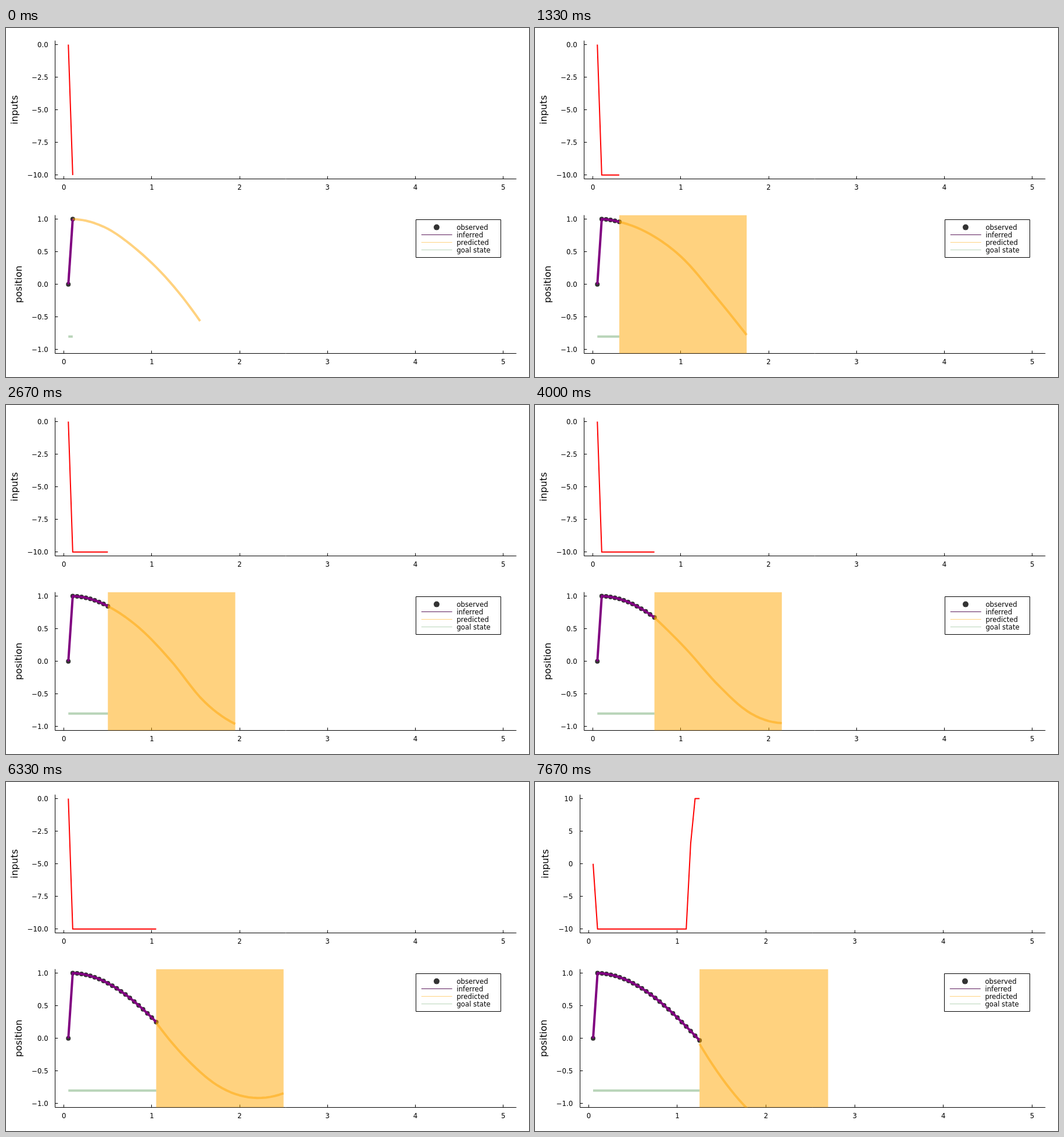
Recreate the animation shown at these times as an HTML page with a canvas. Size 900 by 600 pixels, loop 8 s.

```html
<!DOCTYPE html>
<html lang="en">
<head>
<meta charset="utf-8">
<title>Inputs and position</title>
<style>
  html, body { margin: 0; width: 100%; height: 100%; overflow: hidden; background: #fff; }
  canvas { display: block; width: 900px; height: 600px; }
</style>
</head>
<body>
<canvas id="stage" width="900" height="600"></canvas>
<script>
const ctx = document.getElementById('stage').getContext('2d');
const LOOP = 8000, STEPS = 24, DT = 0.05, HORIZON = 1.45;
const RIGHT = 878.3, X_MIN = -0.1, X_MAX = 5.15;
const TOP = [21.7, 321.7], HEIGHT = 237.9, PAD = HEIGHT * 0.03 / 1.06;
const FONT = '"DejaVu Sans", sans-serif';
const ORANGE = 'rgba(255,165,0,0.5)', GREEN = 'rgba(0,100,0,0.28)', DOT = 'rgba(0,0,0,0.8)';

// Forecast shape: step, then the fall in px below the last observation at five even points.
const FORECASTS = [
  [0, 0, 14, 52, 105, 175.5],
  [4, 0, 22, 63, 126.5, 194.5],
  [8, 0, 38, 95, 162.5, 202.5],
  [12, 0, 54.5, 116, 164, 181.5],
  [16, 0, 62.5, 116.5, 147, 150],
  [19, 1, 66, 111.5, 130, 122.5],
  [23, 6, 87, 144, 181, 197]
];

const crisp = v => Math.floor(v) + 0.5;

function position(i) {
  if (i === 0) return 0;
  const s = (i - 1) * DT;
  return 1 - (0.88 - 0.1 * s * s) * s * (s + DT);
}

function input(i) {
  if (i === 0) return 0;
  return i < 22 ? -10 : i === 22 ? 3.08 : 10;
}

function forecast(step) {
  let n = 0;
  while (n < FORECASTS.length - 2 && FORECASTS[n + 1][0] <= step) n++;
  const a = FORECASTS[n], b = FORECASTS[n + 1];
  const mix = (step - a[0]) / (b[0] - a[0]);
  const p = a.slice(1).map((v, i) => v + (b[i + 1] - v) * mix);
  p.unshift(3 * p[0] - 3 * p[1] + p[2]);
  p.push(3 * p[5] - 3 * p[4] + p[3]);
  return u => {
    const i = Math.min(3, Math.floor(u * 4)), f = u * 4 - i;
    const [p0, p1, p2, p3] = p.slice(i, i + 4);
    return p1 + f / 2 * (p2 - p0 + f * (2 * p0 - 5 * p1 + 4 * p2 - p3 + f * (3 * (p1 - p2) + p3 - p0)));
  };
}

function line(points, color, width) {
  ctx.strokeStyle = color;
  ctx.lineWidth = width;
  ctx.beginPath();
  points.forEach(([x, y]) => ctx.lineTo(x, y));
  ctx.stroke();
}

function dot(x, y, r) {
  ctx.fillStyle = DOT;
  ctx.beginPath();
  ctx.arc(x, y, r, 0, Math.PI * 2);
  ctx.fill();
}

function text(str, x, y, align, size = 11.7) {
  ctx.fillStyle = '#000';
  ctx.font = size + 'px ' + FONT;
  ctx.textAlign = align;
  ctx.fillText(str, x, y);
}

function panel(row, left, lo, hi) {
  const top = TOP[row], bottom = top + HEIGHT;
  return {
    left, top, bottom,
    x: t => left + (t - X_MIN) / (X_MAX - X_MIN) * (RIGHT - left),
    y: v => bottom - PAD - (v - lo) / (hi - lo) * (HEIGHT - 2 * PAD)
  };
}

function axes(p, ticks, digits, label, labelX) {
  const x0 = crisp(p.left), y0 = crisp(p.bottom);
  line([[x0, p.top], [x0, y0], [RIGHT, y0]], '#000', 1);
  for (let t = 0; t <= 5; t++) {
    const x = crisp(p.x(t));
    line([[x, y0], [x, y0 - 4.8]], '#000', 1);
    text(t, p.x(t), p.bottom + 18.2, 'center');
  }
  for (const v of ticks) {
    const y = crisp(p.y(v));
    line([[x0, y], [x0 + 4.8, y]], '#000', 1);
    text(v.toFixed(digits).replace('-', '\u2212'), p.left - 12, p.y(v) + 4.3, 'right');
  }
  ctx.save();
  ctx.translate(labelX, p.top + HEIGHT / 2);
  ctx.rotate(-Math.PI / 2);
  text(label, 0, 0, 'center', 16.2);
  ctx.restore();
}

function clipped(p, paint) {
  ctx.save();
  ctx.beginPath();
  ctx.rect(p.left, p.top, RIGHT - p.left, p.bottom - 0.1 - p.top);
  ctx.clip();
  paint();
  ctx.restore();
}

function legend(x) {
  ctx.fillStyle = '#fff';
  ctx.fillRect(x, 329.5, 852 - x, 65);
  ctx.strokeStyle = '#000';
  ctx.lineWidth = 1;
  ctx.strokeRect(x, 329.5, 851.5 - x, 65);
  dot(x + 35.5, 342.6, 5);
  ['#5a1a5a', ORANGE, GREEN].forEach((color, i) => {
    const y = 355.5 + i * 13;
    line([[x + 9.3, y], [x + 62.3, y]], color, 1);
  });
  ['observed', 'inferred', 'predicted', 'goal state'].forEach((name, i) =>
    text(name, x + 69.9, 347 + i * 13, 'left'));
}

function draw(step) {
  const wide = step >= 21, last = step + 1;
  const left = wide ? 77.1 : 84.6;
  const ids = Array.from({ length: last + 1 }, (_, i) => i);
  const time = i => (i + 1) * DT;

  ctx.fillStyle = '#fff';
  ctx.fillRect(0, 0, 900, 600);

  const upper = panel(0, left, -10, Math.max(...ids.map(input)));
  const ticks = !wide ? [-10, -7.5, -5, -2.5, 0] : step === 21 ? [-10, -5, 0] : [-10, -5, 0, 5, 10];
  axes(upper, ticks, wide ? 0 : 1, 'inputs', wide ? 23.3 : 19.5);
  clipped(upper, () => line(ids.map(i => [upper.x(time(i)), upper.y(input(i))]), '#f00', 2));

  const lower = panel(1, left, -1, 1);
  axes(lower, [-1, -0.5, 0, 0.5, 1], 1, 'position', wide ? 19.5 : 27);
  clipped(lower, () => {
    const track = ids.map(i => [lower.x(time(i)), lower.y(position(i))]);
    track.forEach(([x, y]) => dot(x, y, 4));
    line(track, 'purple', 4);

    const [x0, y0] = track[last], x1 = lower.x(time(last) + HORIZON);
    if (step > 0) {
      ctx.fillStyle = ORANGE;
      ctx.fillRect(x0, lower.top, x1 - x0, HEIGHT);
    }
    const fall = forecast(step), n = HORIZON / DT;
    const path = Array.from({ length: Math.round(n) + 1 }, (_, i) => {
      const u = Math.min(1, i / n);
      return [x0 + (x1 - x0) * u, y0 + fall(u)];
    });
    line(path, ORANGE, 4);
    line([[track[0][0], lower.y(-0.8)], [x0, lower.y(-0.8)]], GREEN, 4);
  });
  legend(wide ? 704.5 : 705.5);
}

ctx.lineJoin = 'round';
const start = performance.now();
let shown = -1;

function tick() {
  const t = (performance.now() - start) % LOOP;
  const step = Math.min(STEPS - 1, Math.floor((t + 4) * STEPS / LOOP));
  if (step !== shown) draw(shown = step);
  requestAnimationFrame(tick);
}
tick();
</script>
</body>
</html>
```
